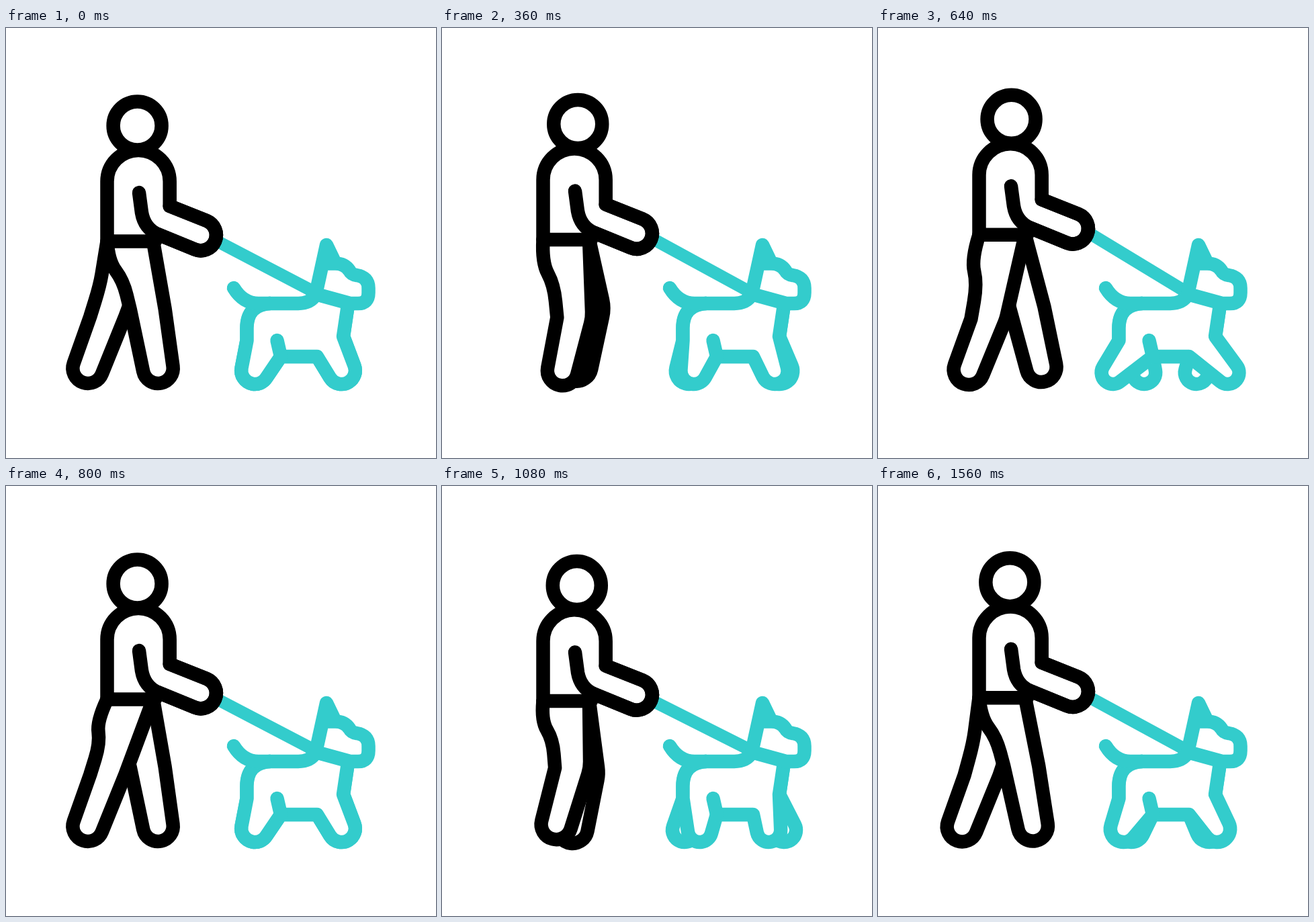
An HTML page with a canvas for the animation above (1600 ms loop, 640 by 640 pixels).

```html
<!DOCTYPE html>
<html lang="en">
<head>
<meta charset="utf-8">
<title>Dog walk</title>
<style>
  html, body { margin: 0; width: 100%; height: 100%; overflow: hidden; background: #fff; }
  canvas { display: block; width: 100vmin; height: 100vmin; }
</style>
</head>
<body>
<canvas id="stage" width="640" height="640"></canvas>
<script>
const ctx = document.getElementById('stage').getContext('2d');
const { sin, cos, abs, acos, atan2, hypot, floor, min, PI } = Math;
const LOOP = 1600, STEP = 200, TICK = 40;
const INK = '#000', TEAL = '#33cccc', LINE = 20.5;
const WAIST = 317.5, HIP_BACK = 150.5, HIP_FRONT = 219;

const DOG = new Path2D(`
  M339 387 Q353 410 376 410 H435 Q453 410 461 397
  M403.5 465 L409 489
  M490 350 L477 323 L461 396 L512 410 H524 Q539.5 410 539.5 394 V387
  Q539.5 371 522 368 Q514 367 511 361 Q504 350.5 490 350.5 H472`);
const TORSO = new Path2D(`
  M222 317.5 H150.5 V228.5 A46.6 46.6 0 0 1 243.7 228.5 V265
  L298.6 286.8 A23 23 0 0 1 281 329.5 L226 307`);
const ARM = new Path2D(`
  M198 245 L202 275 Q206 298 226 307 L281 329.5
  A23 23 0 0 0 298.6 286.8 L243.7 265`);

const mix = (a, b, k) => a + (b - a) * k;

// Key poses come from a cyclic rule and are joined in straight lines
function tween(rule, t) {
  const i = floor(t / STEP), k = t / STEP - i;
  const key = n => rule(n * STEP / LOOP * 2 * PI);
  const next = key(i + 1);
  return key(i).map((v, j) => mix(v, next[j], k));
}

// Two steps per loop: lift of the body, head x, swing of the paws
const bodyRule = a => [-2.4 + 10 * sin(2 * a + 0.25), 199.3 - 3.7 * cos(2 * a), sin(2 * a)];

// One stride per loop: knee and foot, the knee bending forward off the straight leg
function strideRule(a) {
  const hipY = WAIST + bodyRule(a)[0];
  const x = 183.8 + 60.3 * cos(a + 0.3) - 13.3 * cos(2 * a - 0.75) - 6.7 * cos(3 * a + 0.62);
  const y = 506.5 + 3.5 * sin(a);
  const kneeY = 424 + 10 * sin(a - 0.6);
  const bend = 12 + 9 * sin(2 * a - 1.18) + 5 * sin(3 * a);
  return [mix(185, x, (kneeY - hipY) / (y - hipY)) + bend, kneeY, x, y];
}

// Round end hung by tangents between a back and a front point
function foot(bx, by, fx, fy, x, y, r) {
  const aim = (px, py) => atan2(py - y, px - x);
  const open = (px, py) => acos(min(1, r / hypot(px - x, py - y)));
  ctx.lineTo(bx, by);
  ctx.arc(x, y, r, aim(bx, by) - open(bx, by), aim(fx, fy) + open(fx, fy), true);
}

function paint() {
  ctx.fill();
  ctx.stroke();
}

function humanLeg(t, hip, bow) {
  const [kx, ky, x, y] = tween(strideRule, t);
  const back = kx - 26, front = kx + 26;
  const ax = mix(HIP_BACK, back, 0.58) + 4, ay = mix(hip, ky, 0.58);
  const cx = (HIP_BACK + ax) / 2 - bow, cy = (hip + ay) / 2;
  ctx.beginPath();
  ctx.moveTo(HIP_BACK, hip);
  ctx.quadraticCurveTo(cx, cy, (cx + ax) / 2, (cy + ay) / 2);
  ctx.quadraticCurveTo(ax, ay, (ax + back) / 2, (ay + ky) / 2);
  foot(back, ky, front, ky, x, y, 22.5);
  ctx.arcTo(front, ky, HIP_FRONT, hip, 60);
  ctx.lineTo(HIP_FRONT, hip);
  paint();
}

// Rump, hind leg, belly, front leg and chest; both paws mirror each other
function dogBody(swing, inward) {
  const shift = inward * abs(swing) + swing * 24 * -Math.sign(inward);
  const r = 20.3 - 4 * abs(swing), y = 530 - r;
  ctx.beginPath();
  ctx.moveTo(393, 410);
  ctx.quadraticCurveTo(358.5, 412, 358.5, 447);
  foot(358.5, 465, 409, 489, 370.5 + shift, y, r);
  ctx.lineTo(409, 489);
  foot(463, 489, 502, 459, 499.5 - shift, y, r);
  ctx.lineTo(502, 459);
  ctx.lineTo(509, 412);
  paint();
}

function draw(t) {
  const [lift, headX, swing] = tween(bodyRule, t);
  const hip = WAIST + lift;
  ctx.fillStyle = '#fff';
  ctx.fillRect(0, 0, 640, 640);
  ctx.lineCap = ctx.lineJoin = 'round';

  ctx.strokeStyle = TEAL;
  ctx.lineWidth = 18.5;
  ctx.beginPath();
  ctx.moveTo(312, 316 + lift * 1.25);
  ctx.lineTo(459, 393);
  ctx.stroke();

  ctx.lineWidth = LINE;
  dogBody(swing, 8);
  dogBody(swing, -2);
  ctx.stroke(DOG);

  ctx.strokeStyle = INK;
  humanLeg(t + LOOP / 2, hip, 0);
  humanLeg(t, hip, 10);

  ctx.save();
  ctx.translate(0, lift);
  ctx.fill(TORSO);
  ctx.stroke(TORSO);
  ctx.stroke(ARM);
  ctx.restore();

  ctx.beginPath();
  ctx.arc(headX, 145.5 + lift, 36, 0, 2 * PI);
  paint();
}

const start = performance.now();
function tick() {
  const t = (performance.now() - start) % LOOP;
  draw(floor(t / TICK) * TICK);
  requestAnimationFrame(tick);
}
tick();
</script>
</body>
</html>
```
